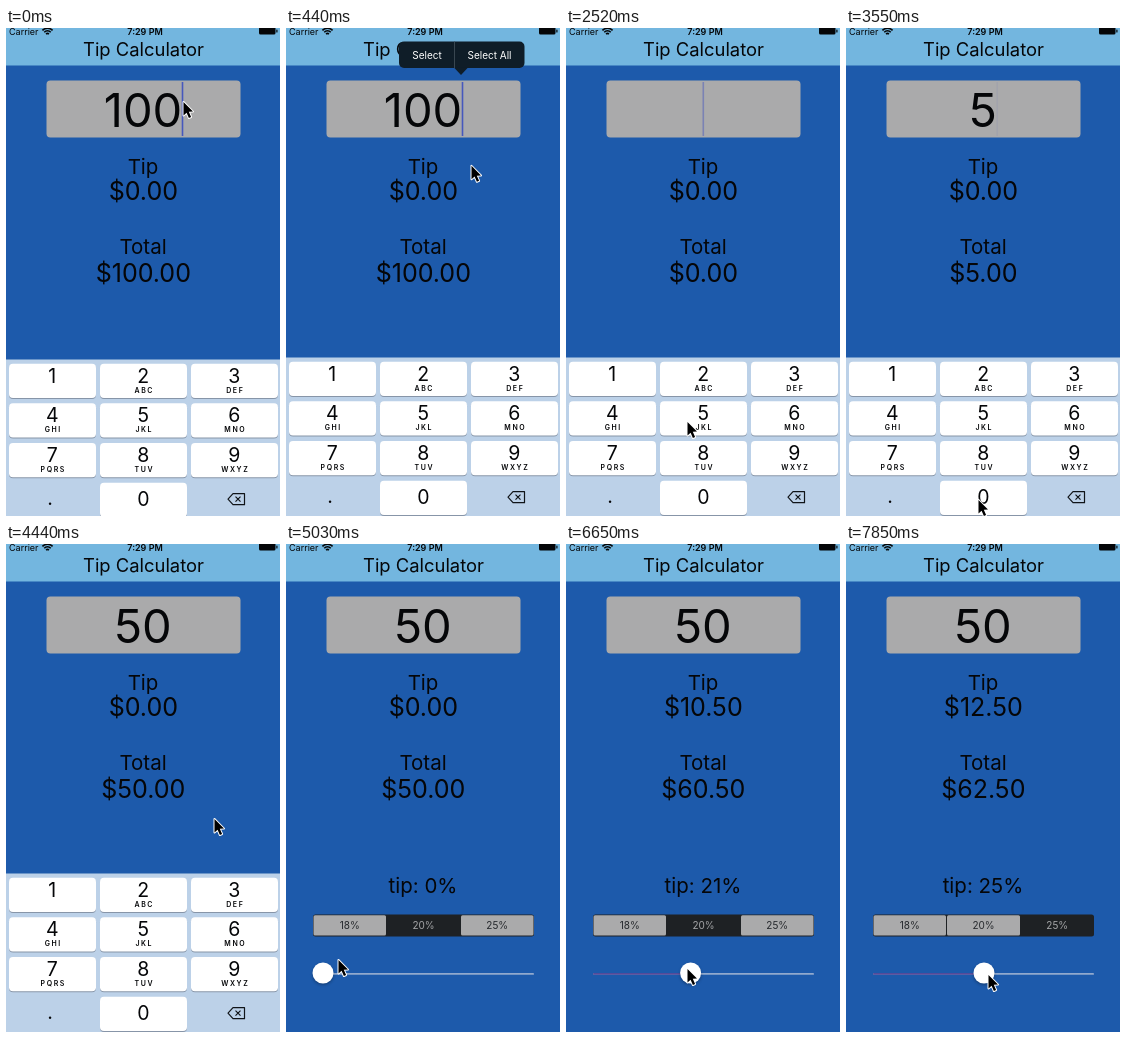
Animation, 274 px wide and 488 px high, one loop 8000 ms. Source, as an HTML page with a canvas:

```html
<!DOCTYPE html>
<html lang="en">
<head>
<meta charset="utf-8">
<title>Tip Calculator</title>
<style>
  html, body { margin: 0; height: 100%; overflow: hidden; background: #1d5aab; }
  canvas { display: block; width: 274px; height: 488px; }
</style>
</head>
<body>
<canvas id="stage"></canvas>
<script>
const W = 274, H = 488, LOOP = 8000, TICKS = 54, TICK = LOOP / TICKS;
const canvas = document.getElementById('stage');
const ctx = canvas.getContext('2d');
const ratio = window.devicePixelRatio || 1;
canvas.width = W * ratio;
canvas.height = H * ratio;

// Tracks: [tick, value, ...]
const POINTER = [
  [0, 177, 73], [2, 177, 73], [8, 225, 456], [10, 228, 466], [13, 228, 466],
  [17, 121, 393], [19, 121, 393], [22, 132, 471], [25, 132, 471], [30, 208, 274],
  [31, 208, 274], [32, 100, 365], [34, 52, 415], [35, 52, 415], [36, 34, 424],
  [37, 34, 424], [45, 121, 424], [48, 135, 425], [50, 135, 425], [53, 142, 430]
];
const KEYBOARD = [[0, 2], [1, 0], [31, 0], [32, 7], [33, 115], [34, 160]];
const KNOB = [[37, 37], [45, 124.6], [48, 138]];
const ENTRIES = [[0, '100'], [3, '100'], [11, '10'], [12, '1'], [13, ''], [18, '5'], [25, '50']];
const KEY_LETTERS = ['', 'ABC', 'DEF', 'GHI', 'JKL', 'MNO', 'PQRS', 'TUV', 'WXYZ'];

function sample(track, tick) {
  const next = track.findIndex(p => p[0] > tick);
  if (next === 0) return track[0].slice(1);
  if (next < 0) return track[track.length - 1].slice(1);
  const a = track[next - 1], b = track[next];
  const f = (tick - a[0]) / (b[0] - a[0]);
  return a.slice(1).map((v, i) => v + (b[i + 1] - v) * f);
}

const clamp = v => Math.max(0, Math.min(1, v));

function rect(x, y, w, h, color, radius = 0) {
  ctx.fillStyle = color;
  ctx.beginPath();
  ctx.roundRect(x, y, w, h, radius);
  ctx.fill();
}

function polygon(points, fill, stroke) {
  ctx.beginPath();
  points.forEach(([x, y]) => ctx.lineTo(x, y));
  ctx.closePath();
  if (stroke) {
    ctx.strokeStyle = stroke;
    ctx.lineWidth = 2;
    ctx.lineJoin = 'round';
    ctx.stroke();
  }
  ctx.fillStyle = fill;
  ctx.fill();
}

// y is the middle of the capital letters
function text(string, x, y, size, { color = '#050608', weight = 400, align = 'center', spacing = 0 } = {}) {
  ctx.font = `${weight} ${size}px Inter, "Liberation Sans", sans-serif`;
  ctx.letterSpacing = spacing + 'px';
  ctx.textAlign = align;
  ctx.fillStyle = color;
  ctx.fillText(string, x + spacing / 2, y + size * 0.364);
  return ctx.measureText(string).width;
}

function drawHeader() {
  rect(0, 0, W, 37.5, '#73b6df');
  text('Carrier', 3, 3.8, 9, { align: 'left' });
  text('7:29 PM', 139, 3.8, 9, { weight: 600 });
  ctx.strokeStyle = '#050608';
  ctx.lineWidth = 1.6;
  for (const r of [2, 4.6, 7.2]) {
    ctx.beginPath();
    ctx.arc(41.5, 7.5, r, -Math.PI * 0.75, -Math.PI * 0.25);
    ctx.stroke();
  }
  rect(253, -1, 16.5, 7.5, '#050608', 1.5);
  rect(270.3, 1.5, 1.2, 3, '#050608', 0.6);
  text('Tip Calculator', 137.5, 21, 18.4);
}

function drawField(entry, caretAlpha) {
  rect(40.5, 52.5, 194, 57, '#aaaaab', 4);
  const width = text(entry, 137, 81.5, 47);
  ctx.globalAlpha = caretAlpha;
  rect(136.5 + width / 2, 54, 1.6, 54, '#4658bd');
  ctx.globalAlpha = 1;
}

function drawMenu() {
  const color = '#0f1d28';
  rect(113, 13.5, 125.5, 26.5, color, 5);
  polygon([[168, 39.5], [182, 39.5], [175, 47]], color);
  rect(168, 13.5, 0.8, 26.5, '#45525c');
  text('Select', 141, 27, 10, { color: '#fff' });
  text('Select All', 203.5, 27, 10, { color: '#fff' });
}

function drawTipControls(percent, knobX) {
  text(`tip: ${percent}%`, 137, 342, 20.5);
  const selected = { 18: 0, 25: 2 }[percent] ?? 1;
  const edges = [27, 100.5, 174.5, 248];
  rect(27, 370.5, 221, 22, '#1e2124', 2.5);
  ['18%', '20%', '25%'].forEach((label, i) => {
    const x = edges[i], w = edges[i + 1] - x, on = i === selected;
    if (!on) rect(x + 0.5, 371.3, w - 1, 20.3, '#aaaaab', 1.5);
    text(label, x + w / 2, 381.5, 10, { color: on ? '#a5a6a8' : '#25282c' });
  });
  rect(27, 429, 221, 1.8, '#91a9cd', 1);
  rect(27, 429, knobX - 27, 1.8, '#544a99', 1);
  ctx.save();
  ctx.shadowColor = 'rgba(0,0,0,.3)';
  ctx.shadowBlur = 3 * ratio;
  ctx.shadowOffsetY = 1.5 * ratio;
  rect(knobX - 10.5, 418.5, 21, 21, '#fff', 10.5);
  ctx.restore();
}

function drawKey(x, y) {
  rect(x, y + 1, 87, 34.3, '#8795a8', 4);
  rect(x, y, 87, 34.3, '#fff', 4);
}

function drawKeyboard(offset) {
  ctx.save();
  ctx.translate(0, offset);
  rect(0, 329.5, W, 160, '#bcd1e8');
  KEY_LETTERS.forEach((letters, i) => {
    const x = 3 + (i % 3) * 91, y = 333.7 + Math.floor(i / 3) * 39.6;
    drawKey(x, y);
    text(String(i + 1), x + 43.3, y + 12, 19.5);
    text(letters, x + 43.5, y + 26.3, 7, { weight: 600, spacing: 1.6 });
  });
  drawKey(94, 452.7);
  text('0', 137.3, 469.3, 19.5);
  text('.', 44, 467.5, 19.5);

  ctx.strokeStyle = '#101418';
  ctx.lineWidth = 1.2;
  ctx.lineJoin = 'round';
  ctx.beginPath();
  ctx.moveTo(222, 469.2);
  ctx.lineTo(227, 463.7);
  ctx.lineTo(238.5, 463.7);
  ctx.lineTo(238.5, 474.7);
  ctx.lineTo(227, 474.7);
  ctx.closePath();
  ctx.moveTo(229.5, 466.7);
  ctx.lineTo(234.5, 471.7);
  ctx.moveTo(234.5, 466.7);
  ctx.lineTo(229.5, 471.7);
  ctx.stroke();
  ctx.restore();
}

function drawPointer(x, y) {
  ctx.save();
  ctx.translate(x + 0.5, y + 1);
  polygon([[0, 0], [0, 13.5], [3.1, 10.7], [5.4, 16], [7.6, 15], [5.3, 9.8], [9.5, 9.6]], '#000', '#fff');
  ctx.restore();
}

function draw(time) {
  const tick = Math.min(TICKS - 1, Math.floor((time + 20) / TICK));
  const [editTick, entry] = ENTRIES.findLast(e => e[0] <= tick);
  const blink = ((tick - editTick) * TICK / 1000) % 1;
  const caret = tick > 30 ? 0 : Math.max(clamp((0.68 - blink) / 0.18), clamp((blink - 0.88) / 0.12));
  const [knobX] = sample(KNOB, tick);
  const percent = Math.floor((knobX - 37) / 4.02);
  const bill = Number(entry), tip = bill * percent / 100;

  ctx.setTransform(ratio, 0, 0, ratio, 0, 0);
  rect(0, 0, W, H, '#1d5aab');
  drawHeader();
  drawField(entry, caret);
  text('Tip', 137, 139, 20.5);
  text('$' + tip.toFixed(2), 137.3, 163, 25);
  text('Total', 137, 219, 20.5);
  text('$' + (bill + tip).toFixed(2), 137.3, 244.5, 25);
  drawTipControls(percent, knobX);
  const [offset] = sample(KEYBOARD, tick);
  if (offset < 160) drawKeyboard(offset);
  if (tick >= 3 && tick < 10) drawMenu();
  drawPointer(...sample(POINTER, tick));
}

function loop() {
  draw(performance.now() % LOOP);
  requestAnimationFrame(loop);
}
loop();
</script>
</body>
</html>
```
